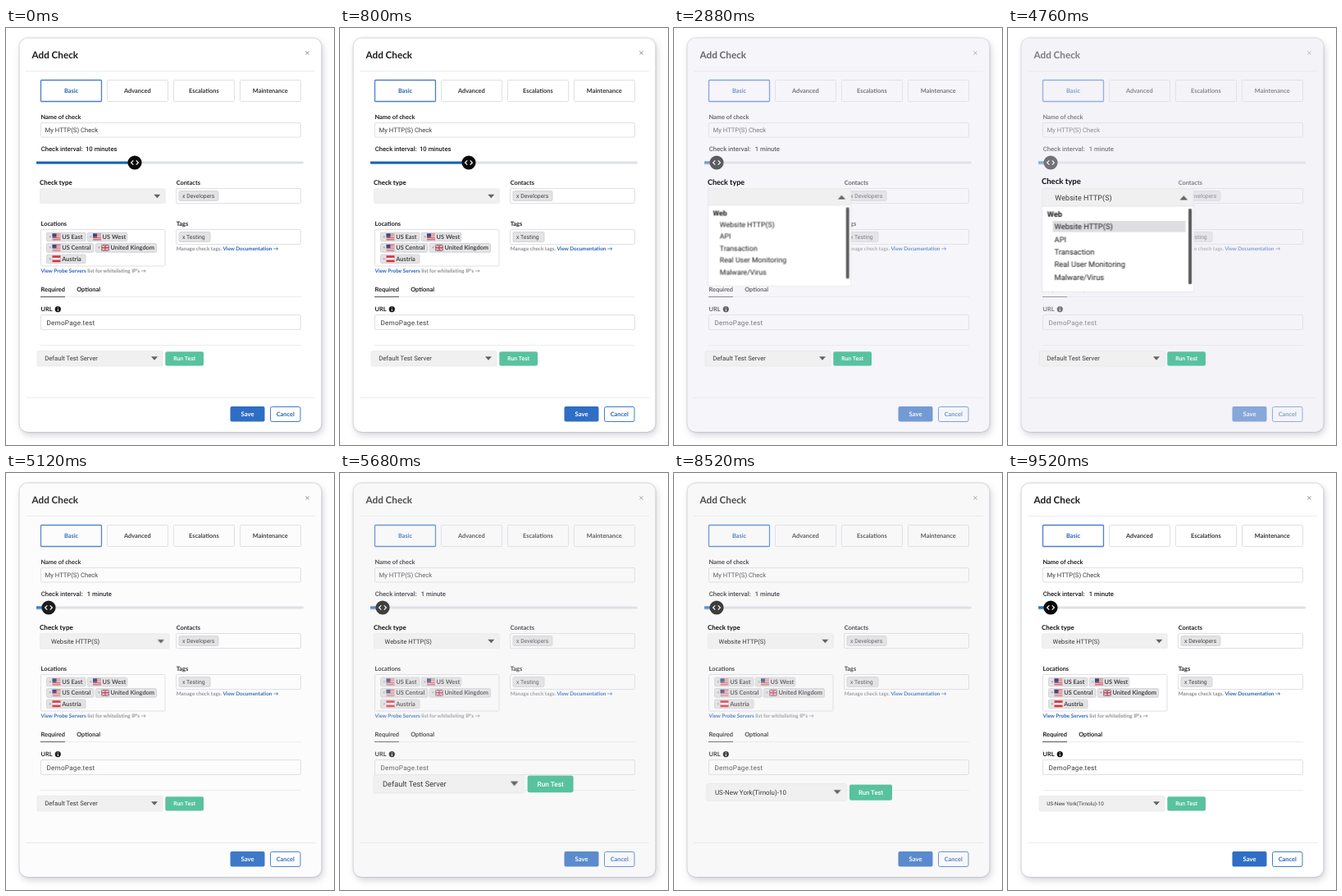
An HTML page that plays this animation: 400x508 px, repeating every 9.72 s.

```html
<!DOCTYPE html>
<html lang="en">
<head>
<meta charset="utf-8">
<title>Add Check</title>
<style>
html, body { margin: 0; width: 100%; height: 100%; overflow: hidden; background: #fff; }
svg { display: block; width: 100%; height: 100%; text-rendering: geometricPrecision; }

/* type */
text { font: 700 7.4px Lato, Inter, sans-serif; fill: #1c1c1e; }
.title { font-size: 11.7px; }
.mid { text-anchor: middle; }
.tab { fill: #333; }
.label { font-size: 7.9px; fill: #0c0c0d; }
.note { font-size: 6.35px; fill: #8b8d92; }
.link { fill: #2563b8; }
.place { fill: #444; }
.x { font-size: 5px; fill: #888; }
.body { font: 400 7.7px Roboto, Inter, sans-serif; fill: #3a3a3d; }
.interval { font: 500 7.7px Roboto, Inter, sans-serif; fill: #1c1c1e; }
.pill { font: 400 6.9px Roboto, Inter, sans-serif; fill: #444; }
.white { fill: #fff; }
.item { font: 400 9.3px Roboto, Inter, sans-serif; fill: #1b1b1d; }
.small { font: 400 7.4px Roboto, Inter, sans-serif; fill: #444; }

/* shapes */
.card { fill: #fff; filter: drop-shadow(0 0 1px rgba(50,50,80,.4)) drop-shadow(2px 4px 4px rgba(50,50,80,.2)); }
.box { fill: #fff; stroke: #dfe0e3; }
.rule { stroke: #ececef; }
.chip { fill: #e3e3e5; stroke: #cfcfd2; stroke-width: .8; }
.select { fill: #f0f0f1; stroke: #e6e6e8; stroke-width: .6; }
.arrow { fill: #636366; }
.panel { fill: #fff; stroke: #e2e2e6; stroke-width: .8; }
.hot { fill: #dedee0; }
.bar { fill: #58585b; }

/* motion */
.a { animation: 9.72s linear infinite; }
#knob { animation-name: slide; }
#fill { animation-name: fill; transform-origin: 37px 164px; }
#dim { animation-name: dim; }
#type { animation-name: zoom-type; transform-origin: 41.5px 195.7px; }
#server { animation-name: zoom-server; transform-origin: 38px 403px; }
#list1 { animation-name: list1; }
#list2 { animation-name: list2; }
#arrow1 { animation-name: flip1; transform-origin: 184.3px 205px; }
#arrow2 { animation-name: flip2; transform-origin: 181px 402.5px; }
#chosen { animation-name: shrink; transform-origin: 47px 405.3px; }
#save { animation-name: press; transform-origin: 315.5px 479.5px; }
.picked1 { animation-name: picked1; }
.before { animation-name: before; }
.after { animation-name: after; }
.hover { animation-name: hover; }
#arrow1, #arrow2, .picked1, .before, .after, .hover { animation-timing-function: step-end; }

@keyframes slide {
  0%, 8.642% { transform: translateX(157px); animation-timing-function: cubic-bezier(.5,0,.3,1); }
  16.049%, 100% { transform: translateX(52px); }
}
@keyframes fill {
  0%, 8.642% { transform: scaleX(1); animation-timing-function: cubic-bezier(.5,0,.3,1); }
  16.049%, 100% { transform: scaleX(.125); }
}
@keyframes dim {
  0%, 22.634% { opacity: 0; fill: #e8e6f2; }
  32.099%, 48.765% { opacity: .5; fill: #e8e6f2; }
  53.498%, 55.144% { opacity: 0; fill: #e4e4e8; }
  61.728%, 84.979% { opacity: .5; fill: #e4e4e8; }
  90.123%, 100% { opacity: 0; fill: #e4e4e8; }
}
@keyframes zoom-type {
  0%, 25.926% { transform: scale(1); animation-timing-function: ease-in-out; }
  32.099%, 49.383% { transform: scale(1.21); animation-timing-function: ease-in-out; }
  53.909%, 100% { transform: scale(1); }
}
@keyframes zoom-server {
  0%, 53.909% { transform: translate(0, 0) scale(1); animation-timing-function: ease-in-out; }
  58.436%, 85.597% { transform: translate(3px, -24px) scale(1.2); animation-timing-function: ease-in-out; }
  90.123%, 100% { transform: translate(0, 0) scale(1); }
}
@keyframes list1 {
  0%, 26.337% { clip-path: inset(0 0 100% 0); }
  28.807%, 48.971% { clip-path: inset(0 0 0 0); }
  51.029%, 100% { clip-path: inset(0 0 100% 0); }
}
@keyframes list2 {
  0%, 58.848% { clip-path: inset(0 0 100% 0); }
  61.728%, 85.185% { clip-path: inset(0 0 0 0); }
  87.243%, 100% { clip-path: inset(0 0 100% 0); }
}
@keyframes flip1 {
  0% { transform: scaleY(1); }
  26.337% { transform: scaleY(-1); }
  51.029%, 100% { transform: scaleY(1); }
}
@keyframes flip2 {
  0% { transform: scaleY(1); }
  58.848% { transform: scaleY(-1); }
  87.243%, 100% { transform: scaleY(1); }
}
@keyframes shrink {
  0%, 85.597% { transform: scale(1); animation-timing-function: ease-in-out; }
  90.123%, 100% { transform: scale(.83); }
}
@keyframes press {
  0% { transform: scale(1); animation-timing-function: step-end; }
  93.416% { transform: scale(1.22); animation-timing-function: step-end; }
  94.65%, 95.885% { transform: scale(1.43); }
  97.942%, 100% { transform: scale(1); }
}
@keyframes picked1 { 0% { opacity: 0; } 36.214%, 100% { opacity: 1; } }
@keyframes before { 0% { opacity: 1; } 76.543%, 100% { opacity: 0; } }
@keyframes after { 0% { opacity: 0; } 76.543%, 100% { opacity: 1; } }
@keyframes hover { 0% { opacity: 0; } 68.313% { opacity: 1; } 76.543%, 100% { opacity: 0; } }
</style>
</head>
<body>
<svg viewBox="0 0 400 508">
  <defs>
    <g id="us">
      <rect width="10" height="8" fill="#f3e9ea"/>
      <path d="M0 .6H10M0 2.9H10M0 5.2H10M0 7.5H10" stroke="#c9525b" stroke-width="1.1"/>
      <rect width="5" height="4.4" fill="#3d4a80"/>
    </g>
    <g id="uk">
      <rect width="10" height="8" fill="#3d4a80"/>
      <path d="M0 0L10 8M10 0L0 8" stroke="#f3e9ea" stroke-width="1.6"/>
      <path d="M0 0L10 8M10 0L0 8" stroke="#c9404b" stroke-width=".6"/>
      <path d="M5 0V8M0 4H10" stroke="#f3e9ea" stroke-width="2.8"/>
      <path d="M5 0V8M0 4H10" stroke="#c9404b" stroke-width="1.5"/>
    </g>
    <g id="at">
      <rect width="10" height="8" fill="#d8323f"/>
      <rect y="2.7" width="10" height="2.6" fill="#fff"/>
    </g>
  </defs>

  <rect class="card" x="16.5" y="12.5" width="368" height="479.5" rx="10"/>

  <!-- header and tabs -->
  <text class="title" x="31.5" y="37">Add Check</text>
  <path d="M365.4 28.4l4 4M369.4 28.4l-4 4" stroke="#77787c" stroke-width=".9"/>
  <path class="rule" d="M24 52.5H377M24 450.5H377"/>
  <rect class="box" x="42.5" y="63.5" width="74" height="26" rx="1" style="stroke:#4b7fcd;stroke-width:1.3"/>
  <rect class="box" x="123.5" y="63.5" width="74" height="26" rx="1"/>
  <rect class="box" x="204.5" y="63.5" width="74" height="26" rx="1"/>
  <rect class="box" x="285.5" y="63.5" width="74" height="26" rx="1"/>
  <text class="mid link" x="79.5" y="78.8">Basic</text>
  <text class="mid tab" x="160.3" y="78.8">Advanced</text>
  <text class="mid tab" x="241.3" y="78.8">Escalations</text>
  <text class="mid tab" x="322.2" y="78.8">Maintenance</text>

  <!-- name and interval -->
  <text x="42.5" y="110.6">Name of check</text>
  <rect class="box" x="42.5" y="115.5" width="317" height="17.5" rx="1.5"/>
  <text class="body" x="47.5" y="127.2">My HTTP(S) Check</text>
  <text class="interval" x="42.7" y="150.2">Check interval:</text>
  <text class="interval" id="count" x="97" y="150.2">10 minutes</text>
  <rect x="37" y="162.6" width="326" height="3" rx="1.5" fill="#dde1e6"/>
  <rect class="a" id="fill" x="37" y="162.6" width="120" height="3" fill="#1463bd"/>
  <g class="a" id="knob">
    <circle cy="164" r="8.6" fill="#0a0a0b"/>
    <path d="M-1.7 161.4L-4.4 164L-1.7 166.6M1.7 161.4L4.4 164L1.7 166.6" fill="none" stroke="#fff" stroke-width="1.2"/>
  </g>

  <!-- contacts and tags -->
  <text x="207.7" y="191">Contacts</text>
  <rect class="box" x="207.5" y="195.5" width="152" height="18" rx="1.5"/>
  <rect class="chip" x="211" y="198.5" width="48" height="12" rx="1.5"/>
  <text class="pill" x="215" y="207">x Developers</text>
  <text x="207.7" y="241">Tags</text>
  <rect class="box" x="207.5" y="245.5" width="152" height="18" rx="1.5"/>
  <rect class="chip" x="211" y="248.5" width="38" height="12" rx="1.5"/>
  <text class="pill" x="215" y="257">x Testing</text>
  <text class="note" x="207.7" y="271.3">Manage check tags. <tspan class="link">View Documentation →</tspan></text>

  <!-- locations -->
  <text x="42.5" y="241">Locations</text>
  <rect class="box" x="42.5" y="245.5" width="151.5" height="44.5" rx="1.5"/>
  <g class="chip">
    <rect x="49.5" y="249.2" width="47.5" height="10.6" rx="1.5"/>
    <rect x="99.3" y="249.2" width="48.5" height="10.6" rx="1.5"/>
    <rect x="49.5" y="262.6" width="57.5" height="10.6" rx="1.5"/>
    <rect x="109.2" y="262.6" width="74.3" height="10.6" rx="1.5"/>
    <rect x="49.5" y="276" width="47.5" height="10.6" rx="1.5"/>
  </g>
  <text class="x" x="52.3" y="256">×</text><use href="#us" x="56.5" y="250.4"/>
  <text class="x" x="102" y="256">×</text><use href="#us" x="106" y="250.4"/>
  <text class="x" x="52.3" y="269.4">×</text><use href="#us" x="56.5" y="263.8"/>
  <text class="x" x="112" y="269.4">×</text><use href="#uk" x="116" y="263.8"/>
  <text class="x" x="52.3" y="282.8">×</text><use href="#at" x="56.5" y="277.2"/>
  <text class="place" x="68.2" y="257">US East</text>
  <text class="place" x="117.6" y="257">US West</text>
  <text class="place" x="68.2" y="270.4">US Central</text>
  <text class="place" x="127.4" y="270.4">United Kingdom</text>
  <text class="place" x="68.2" y="283.8">Austria</text>
  <text class="note" x="42.5" y="297.5"><tspan class="link">View Probe Servers</tspan> list for whitelisting IP's →</text>

  <!-- required fields -->
  <text x="42.5" y="321.2">Required</text>
  <text x="86.2" y="321.2">Optional</text>
  <path class="rule" d="M42 327.5H360M42 386.5H360"/>
  <path d="M42 327.5H72" stroke="#55565a"/>
  <text x="42.5" y="345.3">URL</text>
  <circle cx="63.3" cy="342.6" r="3.6" fill="#111"/>
  <path d="M63.3 342.2V345M63.3 340.3V341.3" stroke="#fff" stroke-width="1"/>
  <rect class="box" x="42.5" y="349.5" width="317" height="18" rx="1.5"/>
  <text class="body" x="49.5" y="361.5" style="font-size:8.2px;letter-spacing:.2px">DemoPage.test</text>

  <!-- footer -->
  <g class="a" id="save">
    <rect x="273.5" y="461" width="42" height="18.5" rx="2" fill="#2f6ec5"/>
    <text class="mid white" x="294.5" y="472.8" style="font-size:7.7px">Save</text>
  </g>
  <rect class="box" x="322.5" y="461.5" width="36.5" height="18" rx="2" style="stroke:#3f7dcb"/>
  <text class="mid link" x="340.7" y="472.8">Cancel</text>

  <rect class="a" id="dim" x="16.5" y="12.5" width="368" height="479.5" rx="10"/>

  <!-- check type -->
  <g class="a" id="type">
    <text class="label" x="41" y="191.3">Check type</text>
    <rect class="select" x="41.5" y="195.7" width="152.7" height="18" rx="1.5"/>
    <text class="a picked1 body" x="54.6" y="207.6" style="font-size:7.5px">Website HTTP(S)</text>
    <path class="a arrow" id="arrow1" d="M180.3 202.8H188.3L184.3 207.2Z"/>
    <g class="a" id="list1">
      <g transform="translate(7.202 33.964) scale(.82645)">
        <rect class="panel" x="41.5" y="217" width="185" height="104.5"/>
        <rect class="a picked1 hot" x="54.5" y="235" width="162" height="13.5"/>
        <rect class="bar" x="220" y="220" width="4" height="92" rx="1.5"/>
        <text class="item" x="47.7" y="230.2" style="font-weight:700">Web</text>
        <text class="item" x="56.6" y="245">Website HTTP(S)</text>
        <text class="item" x="56.6" y="260.6">API</text>
        <text class="item" x="56.6" y="276">Transaction</text>
        <text class="item" x="56.6" y="290.6">Real User Monitoring</text>
        <text class="item" x="56.6" y="307">Malware/Virus</text>
      </g>
    </g>
  </g>

  <!-- test server -->
  <g class="a" id="server">
    <rect class="select" x="38" y="393.5" width="153" height="18.5" rx="1.5"/>
    <text class="a before body" x="47.2" y="405.3">Default Test Server</text>
    <g class="a after"><text class="a body" id="chosen" x="47.2" y="405.3">US-New York(Tirnolu)-10</text></g>
    <path class="a arrow" id="arrow2" d="M177 400.3H185L181 404.7Z"/>
    <rect x="194.3" y="394.3" width="46.7" height="17.2" rx="2" fill="#58c29f"/>
    <text class="mid white" x="217.7" y="405.3" style="font:500 6.9px Roboto,sans-serif">Run Test</text>
    <g class="a" id="list2">
      <g transform="translate(3.833 87.167) scale(.83333)">
        <rect class="panel" x="41" y="390" width="184" height="100.5"/>
        <rect class="a hover hot" x="49.5" y="392.5" width="162.5" height="20.5"/>
        <rect class="a after hot" x="49.5" y="416" width="162.5" height="20.5"/>
        <rect class="bar" x="218" y="391" width="4" height="90" rx="1.5"/>
        <text class="item" x="52.3" y="401.2">Default Test Server</text>
        <text class="small" x="52.3" y="410">TEST</text>
        <text class="item" x="52.3" y="425.8">US-New York (Tirnolu)-10</text>
        <text class="small" x="52.3" y="434.8">US EAST</text>
        <text class="item" x="52.3" y="450.8">US-New York(Tirnolu)-11</text>
        <text class="small" x="52.3" y="459.8">US East</text>
        <text class="item" x="52.3" y="475.8">US-New York(Tirnolu)-12</text>
        <text class="small" x="52.3" y="484.8">US EAST</text>
      </g>
    </g>
  </g>
</svg>
<script>
// The minutes follow the knob's place on the track.
const knob = document.getElementById('knob');
const count = document.getElementById('count');
let shown = 10;

function tick() {
  const x = new DOMMatrix(getComputedStyle(knob).transform).e;
  const n = Math.round(1 + 9 * (x - 52) / 105);
  if (n !== shown) {
    shown = n;
    count.textContent = n + (n === 1 ? ' minute' : ' minutes');
    count.setAttribute('x', n < 10 ? 98.8 : 97);
  }
  requestAnimationFrame(tick);
}
tick();
</script>
</body>
</html>
```
